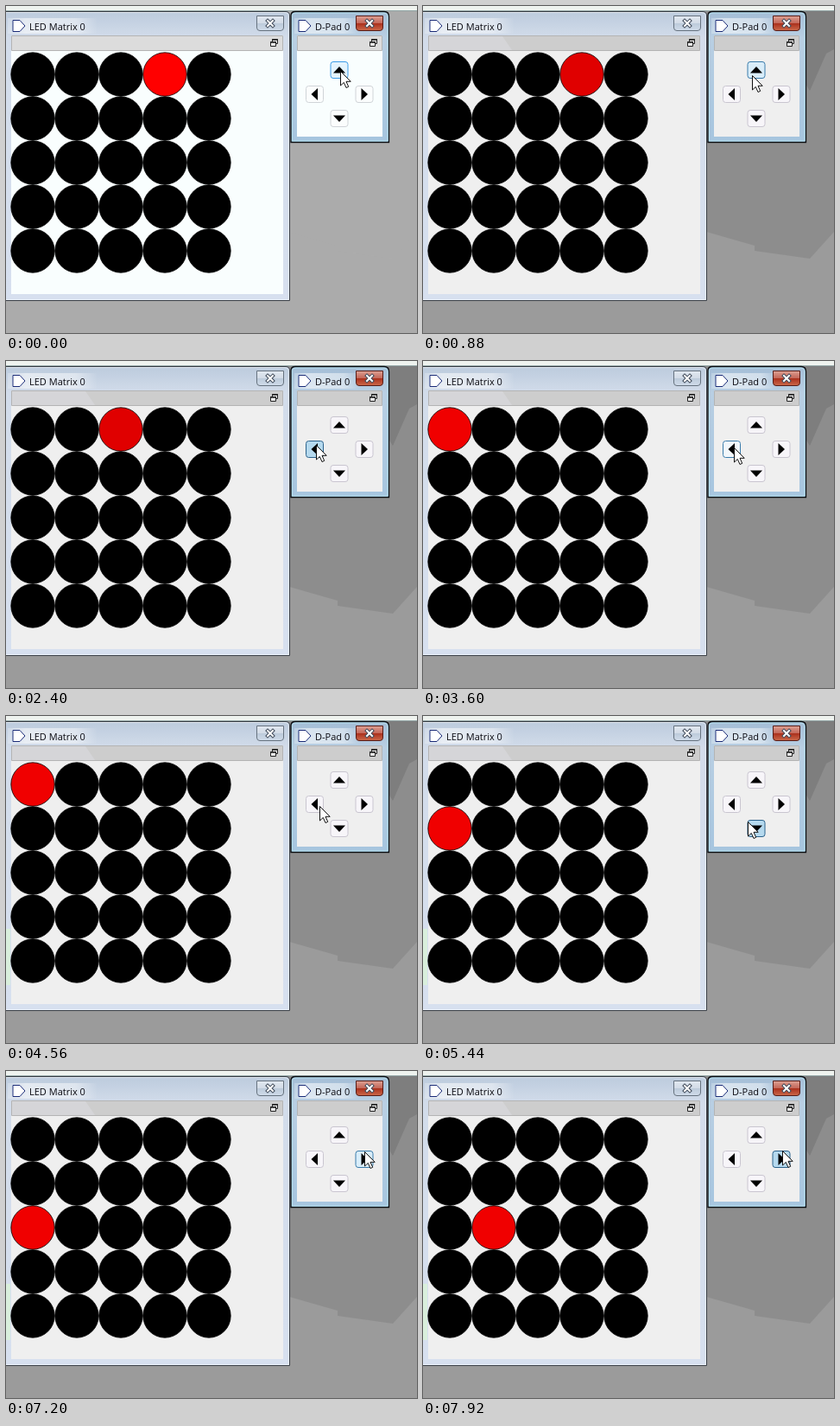
Write an HTML page that moves like this. It is 476x378 px and loops after 8 s.

```html
<!DOCTYPE html>
<html lang="en">
<head>
<meta charset="utf-8">
<title>LED Matrix</title>
<style>
html, body { margin: 0; width: 100%; height: 100%; overflow: hidden; }
svg {
  display: block;
  --desk: #8d8d8d; --low: #9b9b9b; --dark: #7e7e7e;
  --body: #efefef; --bar: #cdcdcd; --key: #f7f5f9; --keyLine: #c9c5d0;
}
svg.bright {
  --desk: #ababab; --low: #ababab; --dark: #ababab;
  --body: #f9fefe; --bar: #dcdcdc; --key: #fbfdfd; --keyLine: #d0d4d8;
}
text { font: 11px "Open Sans", "Noto Sans", sans-serif; fill: #0b0b12; }
.body { fill: var(--body); }
.bar { fill: var(--bar); stroke: #b4b4b4; }
.key rect { fill: var(--key); stroke: var(--keyLine); }
.key.focus rect { fill: #f2f7fb; stroke: #3b7cab; }
.key.hover rect { fill: #d9edf9; stroke: #3b7cab; }
.key.down rect { fill: #b5d9ee; stroke: #2c628b; }
.bright .key.focus rect { fill: #e4f3fd; stroke: #3c9be8; }
.bright .shade { display: none; }
</style>
</head>
<body>
<svg id="stage" width="476" height="378" viewBox="0 0 476 378">
  <defs>
    <linearGradient id="frame" x2="0" y2="1">
      <stop offset="0" stop-color="#bccbdd"/><stop offset=".09" stop-color="#d2dcea"/>
      <stop offset="1" stop-color="#d7e0ef"/>
    </linearGradient>
    <linearGradient id="active" x2="0" y2="1">
      <stop offset="0" stop-color="#a3bdd6"/><stop offset=".2" stop-color="#b9cfe3"/>
      <stop offset="1" stop-color="#a6c5df"/>
    </linearGradient>
    <linearGradient id="glow">
      <stop offset="0" stop-color="#fff" stop-opacity=".2"/><stop offset=".2" stop-color="#fff" stop-opacity=".55"/>
      <stop offset=".75" stop-color="#fff" stop-opacity=".45"/><stop offset="1" stop-color="#fff" stop-opacity="0"/>
    </linearGradient>
    <linearGradient id="pale" x2="0" y2="1">
      <stop offset="0" stop-color="#e1e8f0"/><stop offset=".48" stop-color="#d3dce7"/>
      <stop offset=".5" stop-color="#bccada"/><stop offset="1" stop-color="#d0dcea"/>
    </linearGradient>
    <linearGradient id="red" x2="0" y2="1">
      <stop offset="0" stop-color="#dda093"/><stop offset=".48" stop-color="#c4685a"/>
      <stop offset=".5" stop-color="#a92e1b"/><stop offset="1" stop-color="#cc6a4b"/>
    </linearGradient>
    <g id="tag"><path d="M0 .5H8L14 7 8 13.500H0Z" fill="#fff" stroke="#1b2c78"/></g>
    <g id="dock" fill="#eee" stroke="#222">
      <path d="M2.500 .5H8.500V5.500H2.500Z"/><path d="M2 1H9" stroke-width="1.500"/>
      <path d="M.5 3.500H6.500V8.500H.5Z"/><path d="M0 4H7" stroke-width="1.500"/>
    </g>
    <g id="cross" fill="none" stroke-linecap="square">
      <path d="M-3-3 3 3M3-3-3 3" stroke="#3f4a5a" stroke-width="4"/>
      <path d="M-3-3 3 3M3-3-3 3" stroke="#fff" stroke-width="2"/>
    </g>
  </defs>

  <path d="M0 0H476V378H0Z" fill="var(--desk)"/>
  <path d="M443 5H476V50L467 55 448 98 443 90Z" fill="var(--dark)"/>
  <path d="M0 261H328L384 277V283L448 292 476 261V378H0Z" fill="var(--low)"/>
  <path d="M0 0H476V5H0Z" fill="#eff3ef"/>
  <path d="M0 5.500H476" stroke="#8fa3a3"/>

  <path d="M-1 6.500H324Q328.500 6.500 328.500 11V340.500H-1Z" fill="url(#frame)" stroke="#3a3f46"/>
  <path d="M0 7.500H323Q327.500 8 327.500 12V339.500H0" fill="none" stroke="#edf3f9" stroke-opacity=".8"/>
  <path d="M2 14H106V32H2Z" fill="url(#glow)"/>
  <path id="tint" d="M0 246H5V311H0Z" fill="#d9efdc"/>
  <path class="body" d="M6 34H321V333H6Z"/>
  <path class="bar" d="M6.500 34.500H320.500V51.500H6.500Z"/>
  <path class="shade" d="M7 35H92L103 51H7Z" fill="#dcdce2" opacity=".55"/>
  <use href="#tag" x="8" y="16"/>
  <text x="27" y="28">LED Matrix 0</text>
  <use href="#dock" x="306" y="38"/>
  <path d="M290.500 11.500H321.500V25Q321.500 28.500 318 28.500H294Q290.500 28.500 290.500 25Z" fill="url(#pale)" stroke="#66727f"/>
  <use href="#cross" x="306" y="20"/>

  <path d="M330 11Q330 6.500 335 6.500H438Q443.500 6.500 443.500 12V157.500H330Z" fill="url(#active)" stroke="#0a0d10" stroke-width="1.300"/>
  <path d="M331.500 156V12Q331.500 8 336 8H437Q442 8 442 13V156Z" fill="none" stroke="#b9e9f4" stroke-opacity=".8"/>
  <path d="M334 14H410V32H334Z" fill="url(#glow)"/>
  <path class="body" d="M337 34H436V151H337Z"/>
  <path class="bar" d="M337.500 34.500H435.500V51.500H337.500Z"/>
  <use href="#tag" x="339" y="16"/>
  <text x="358" y="28">D-Pad 0</text>
  <use href="#dock" x="421" y="38"/>
  <path d="M405.500 11.500H436.500V25Q436.500 28.500 433 28.500H409Q405.500 28.500 405.500 25Z" fill="url(#red)" stroke="#571d18"/>
  <use href="#cross" x="421" y="20"/>

  <g id="leds"></g>
  <g id="pad"></g>
  <path id="cursor" d="M.5 .5V17L4.300 13.400 7 19.500 9.700 18.300 7 12.300H12.200Z" fill="#fff" stroke="#111"/>
</svg>
<script>
const LOOP = 8000;
const $ = id => document.getElementById(id);

function add(parent, name, attrs) {
  const el = document.createElementNS("http://www.w3.org/2000/svg", name);
  for (const k in attrs) el.setAttribute(k, attrs[k]);
  return parent.appendChild(el);
}

const leds = [];
for (let i = 0; i < 25; i++)
  leds.push(add($("leds"), "circle", {
    cx: 31 + 51 * (i % 5), cy: 79 + 51 * Math.floor(i / 5), r: 25.2, stroke: "#000", "stroke-width": 0.8
  }));

const keys = {};
for (const [name, x, y, turn] of [["up", 386, 74, 0], ["right", 415, 102, 90], ["down", 386, 130, 180], ["left", 357.5, 102, 270]]) {
  const g = keys[name] = add($("pad"), "g", { transform: `translate(${x} ${y})` });
  add(g, "rect", { x: -10, y: -9.5, width: 20, height: 19, rx: 3 });
  add(g, "path", { d: "M-7 3.500 0-4 7 3.500Z", transform: `rotate(${turn})` });
}

// Each list is sorted by start time
const lit = [[0, 3], [2080, 2], [2720, 1], [3280, 0], [5200, 5], [6000, 10], [7680, 11]];
const keyStates = [
  [0, "up", "focus"], [80, "up", "hover"], [1440, "up", "focus"], [1760, "left", "hover"],
  [2080, "left", "down"], [2480, "left", "hover"], [2720, "left", "down"], [2960, "left", "hover"],
  [3280, "left", "down"], [3520, "left", "focus"], [4480, "", ""], [4880, "down", "hover"],
  [5200, "down", "down"], [5520, "down", "hover"], [6000, "down", "down"], [6240, "down", "hover"],
  [6400, "", ""], [7120, "right", "hover"], [7680, "right", "down"]
];
const path = [
  [0, 387, 75], [80, 387, 75], [400, 381, 80], [1360, 381, 80], [1840, 359, 97], [2720, 359, 97],
  [3200, 360, 100], [4400, 360, 100], [4960, 376, 122], [6160, 376, 122], [6560, 398, 110],
  [6800, 400, 108], [7280, 416, 92], [8000, 416, 92]
];

const current = (list, t) => list.findLast(s => s[0] <= t);

function cursorAt(t) {
  const n = path.findIndex(p => p[0] > t);
  const [a, x, y] = path[n - 1], [b, u, v] = path[n];
  const k = (t - a) / (b - a), e = k * k * (3 - 2 * k);
  return [Math.round(x + (u - x) * e), Math.round(y + (v - y) * e)];
}

function draw(t) {
  const bright = t < 80;
  $("stage").classList.toggle("bright", bright);
  $("tint").style.display = t < 4480 ? "none" : "";

  const on = current(lit, t)[1];
  const red = bright ? "#f00" : t < 3280 ? "#e00000" : "#f00000";
  leds.forEach((led, i) => led.setAttribute("fill", i === on ? red : "#000"));

  const [, active, state] = current(keyStates, t);
  for (const name in keys)
    keys[name].setAttribute("class", name === active ? "key " + state : "key");

  $("cursor").setAttribute("transform", `translate(${cursorAt(t)})`);
}

const start = performance.now();
function tick() {
  draw((performance.now() - start) % LOOP);
  requestAnimationFrame(tick);
}
tick();
</script>
</body>
</html>
```
